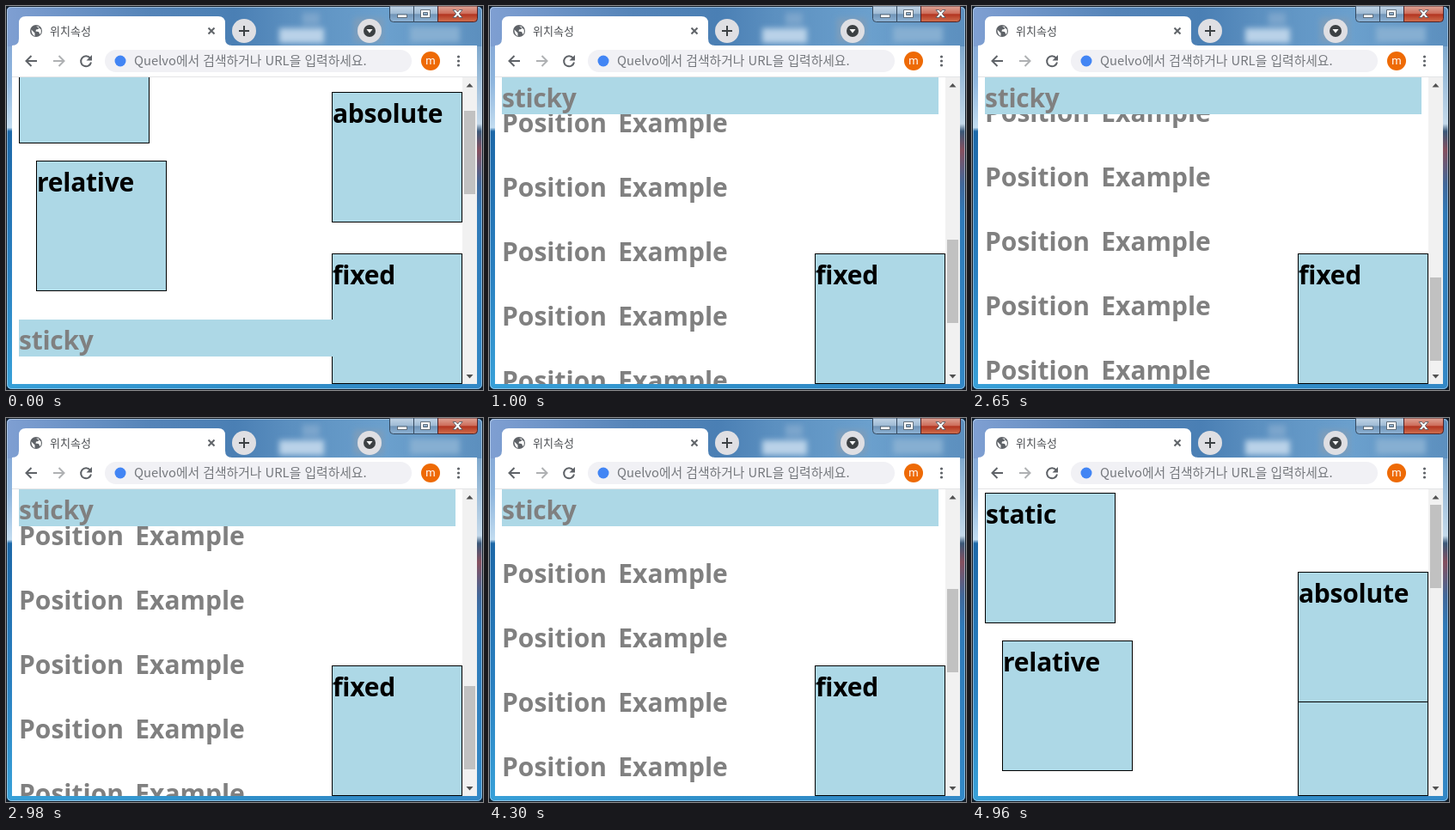
Recreate the animation shown at these times as an HTML page. Size 555 px wide and 447 px high, loop 5290 ms.

```html
<!DOCTYPE html>
<html lang="ko">
<head>
<meta charset="utf-8">
<title>위치속성</title>
<style>
  html, body { margin: 0; width: 100%; height: 100%; overflow: hidden; }
  svg { display: block; width: 555px; height: 447px; }
  .ui { font-family: "Noto Sans CJK KR", "Noto Sans CJK", sans-serif; }
  .h1 { font: bold 30px "Open Sans", "Noto Sans", sans-serif; word-spacing: 5.5px; }
  .short { letter-spacing: -.25px; }
  .box { fill: #add8e6; stroke: #000; }
  .icon { fill: none; stroke: #5f6368; stroke-width: 2; }
</style>
</head>
<body>
<svg viewBox="0 0 555 447">
  <defs>
    <linearGradient id="top">
      <stop offset="0" stop-color="#7f9fd2"/>
      <stop offset=".3" stop-color="#5584b8"/>
      <stop offset=".48" stop-color="#4a7fb4"/>
      <stop offset=".6" stop-color="#5c90c0"/>
      <stop offset=".8" stop-color="#6ba0cd"/>
      <stop offset="1" stop-color="#5c8fbe"/>
    </linearGradient>
    <linearGradient id="left" x2="0" y2="1">
      <stop offset="0" stop-color="#7f9fd2"/>
      <stop offset=".2" stop-color="#8fb6de"/>
      <stop offset=".32" stop-color="#c2dcf0"/>
      <stop offset=".33" stop-color="#1d68a8"/>
      <stop offset=".7" stop-color="#2a80c0"/>
      <stop offset="1" stop-color="#38a0d8"/>
    </linearGradient>
    <linearGradient id="right" x2="0" y2="1">
      <stop offset="0" stop-color="#5c8fbe"/>
      <stop offset=".15" stop-color="#8fb4d4"/>
      <stop offset=".31" stop-color="#c4d9ea"/>
      <stop offset=".33" stop-color="#3b5878"/>
      <stop offset=".38" stop-color="#86505f"/>
      <stop offset=".47" stop-color="#41689a"/>
      <stop offset=".55" stop-color="#2f7ab8"/>
      <stop offset="1" stop-color="#3388c6"/>
    </linearGradient>
    <linearGradient id="bottom">
      <stop offset="0" stop-color="#38a0d8"/>
      <stop offset=".5" stop-color="#2f8ec8"/>
      <stop offset="1" stop-color="#3388c6"/>
    </linearGradient>
    <linearGradient id="glass" x2="0" y2="1">
      <stop offset="0" stop-color="#c3d6e8"/>
      <stop offset=".5" stop-color="#9db9d3"/>
      <stop offset=".52" stop-color="#6f93b6"/>
      <stop offset="1" stop-color="#8fb4d6"/>
    </linearGradient>
    <linearGradient id="red" x2="0" y2="1">
      <stop offset="0" stop-color="#e0a698"/>
      <stop offset=".5" stop-color="#cc6a57"/>
      <stop offset=".52" stop-color="#b2331f"/>
      <stop offset="1" stop-color="#d0704f"/>
    </linearGradient>
    <filter id="blur"><feGaussianBlur stdDeviation="3"/></filter>
    <clipPath id="bar"><rect x="2" y="2" width="551" height="45"/></clipPath>
    <clipPath id="view"><rect x="7" y="83" width="524" height="357"/></clipPath>
  </defs>

  <!-- window frame -->
  <rect width="555" height="447" fill="#111c28"/>
  <rect x="1" y="1" width="553" height="445" rx="5" fill="url(#bottom)"/>
  <path d="M1 6Q1 1 6 1H8V440H1z" fill="url(#left)"/>
  <path d="M547 1H549Q554 1 554 6V440H547z" fill="url(#right)"/>
  <path d="M1 47V6Q1 1 6 1H549Q554 1 554 6V47z" fill="url(#top)"/>
  <g clip-path="url(#bar)"><g filter="url(#blur)">
    <rect x="318" y="26" width="52" height="17" fill="#b9d2e8"/>
    <rect x="345" y="8" width="20" height="14" fill="#7ba5cc"/>
    <rect x="405" y="14" width="34" height="28" fill="#7d9dbb"/>
    <rect x="470" y="24" width="58" height="18" fill="#86afd2"/>
  </g></g>
  <rect x="1.5" y="1.5" width="552" height="444" rx="5" fill="none" stroke="#d4e6f4" stroke-opacity=".55"/>

  <!-- caption buttons -->
  <path d="M446.500 0H474.500V18.500H450.500Q446.500 18.500 446.500 14.500z" fill="url(#glass)" stroke="#34485e"/>
  <path d="M474.500 0H502.500V18.500H474.500z" fill="url(#glass)" stroke="#34485e"/>
  <path d="M502.500 0H548.500V14.500Q548.500 18.500 544.500 18.500H502.500z" fill="url(#red)" stroke="#4a2228"/>
  <g fill="#fff" stroke="#46535f" stroke-width=".8">
    <rect x="455.500" y="10" width="11" height="3.500"/>
    <path d="M482.500 4.500h11v9h-11zM485.500 7.500v3h5v-3z" fill-rule="evenodd"/>
    <path d="M520 4.500h3.500l2 2.500 2-2.500h3.500l-3.700 4.500 3.700 4.500h-3.500l-2-2.500-2 2.500h-3.500l3.700-4.500z"/>
  </g>

  <!-- tab strip -->
  <path d="M7 46Q15 46 15 38V20Q15 12 23 12H247Q255 12 255 20V38Q255 46 263 46H548V440H7z" fill="#fff"/>
  <circle cx="35" cy="29" r="7" fill="#5f6368"/>
  <path d="M29.500 27.500l4 4v3.500q-4-1.500-4-7.500zM35 23.500l3.500 .5-1 3-2.500 .5-.5 2 3.500 .5 1.500 3q2-2 1-6" fill="#fff"/>
  <text class="ui" x="51" y="33.500" font-size="13" fill="#4c4f53">위치속성</text>
  <path class="icon" d="M235.500 25.500l7 7m0-7l-7 7"/>
  <circle cx="277" cy="29" r="14" fill="#dfdfe3"/>
  <path d="M271 29h12M277 23v12" stroke="#3c4043" stroke-width="2"/>
  <circle cx="423" cy="29" r="14" fill="#dfdfe3"/>
  <circle cx="423" cy="29" r="7" fill="#3c4043"/>
  <path d="M419.500 27h7l-3.500 4.500z" fill="#fff"/>

  <!-- toolbar -->
  <path class="icon" d="M36 64H24m5.500-6l-6 6 6 6"/>
  <path class="icon" d="M55 64h12m-5.500-6l6 6-6 6" stroke-opacity=".5"/>
  <path class="icon" d="M97.800 60.500A6 6 0 1 0 99 65.500"/>
  <path d="M100 57v6.500h-6.500z" fill="#5f6368"/>
  <rect x="115" y="51" width="357" height="26" rx="13" fill="#f1f1f5"/>
  <circle cx="133" cy="64" r="6.500" fill="#4285f4"/>
  <text class="ui" x="149" y="69.300" font-size="14.800" fill="#75787d">Quelvo에서 검색하거나 URL을 입력하세요.</text>
  <circle cx="494" cy="64" r="11" fill="#ee6a05"/>
  <text x="494" y="68" font-size="13" fill="#fff" text-anchor="middle" font-family="Roboto, sans-serif">m</text>
  <g fill="#5f6368">
    <circle cx="526.500" cy="59" r="1.600"/>
    <circle cx="526.500" cy="64" r="1.600"/>
    <circle cx="526.500" cy="69" r="1.600"/>
  </g>
  <path d="M7 82.500H548" stroke="#e3e4e6"/>

  <g id="page" clip-path="url(#view)"></g>

  <!-- scrollbar -->
  <rect x="531" y="83" width="17" height="357" fill="#f1f1f1"/>
  <path d="M535.500 94.500h8l-4-4.500z" fill="#505050"/>
  <path id="down" d="M535.500 429h8l-4 4.500z"/>
  <rect id="thumb" x="533" width="13" height="97" fill="#c1c1c1"/>
</svg>

<script>
const LOOP = 5290, TOP = 83, MAX = 833;
// [time, scroll offset]
const STEPS = [
  [0, 83], [330, 220], [670, 430], [1000, 636], [1330, 745], [1660, MAX],
  [2650, 798], [2980, 785], [3640, 743], [3970, 554], [4300, 366],
  [4630, 185], [4960, 4]
];

const $ = id => document.getElementById(id);

function add(parent, tag, attrs, text = '') {
  const el = document.createElementNS('http://www.w3.org/2000/svg', tag);
  for (const key in attrs) el.setAttribute(key, attrs[key]);
  el.textContent = text;
  parent.append(el);
  return el;
}

const move = (el, x, y) => el.setAttribute('transform', `translate(${x} ${y})`);

function title(parent, x, y, fill, text) {
  const style = text.includes(' ') ? 'h1' : 'h1 short';
  add(parent, 'text', { class: style, x, y, fill }, text);
}

function makeBox(name, x, y) {
  const g = add($('page'), 'g', {});
  add(g, 'rect', { class: 'box', x: .5, y: .5, width: 151, height: 151 });
  title(g, 1, 36, '#000', name);
  move(g, x, y);
  return { g, x, y };
}

const headings = add($('page'), 'g', {});
for (let i = 1; i <= 10; i++) title(headings, 15, 483 + 75 * i, '#808080', 'Position Example');

const flowing = [makeBox('static', 15, 91), makeBox('relative', 35, 263)];
makeBox('fixed', 379, 288);
flowing.push(makeBox('absolute', 379, 183));

const sticky = add($('page'), 'g', {});
add(sticky, 'rect', { width: 508, height: 43, fill: '#add8e6' });
title(sticky, 0, 35, '#808080', 'sticky');

function render(time) {
  const scroll = STEPS.filter(([start]) => start <= time).pop()[1];
  move(headings, 0, -scroll);
  for (const { g, x, y } of flowing) move(g, x, y - scroll);
  move(sticky, 15, Math.max(TOP, 448 - scroll));
  $('thumb').setAttribute('y', 100 + Math.floor(scroll / MAX * 226));
  $('down').setAttribute('fill', scroll < MAX ? '#505050' : '#a3a3a3');
}

const begin = performance.now();
function tick() {
  render((performance.now() - begin) % LOOP);
  requestAnimationFrame(tick);
}
tick();
</script>
</body>
</html>
```
